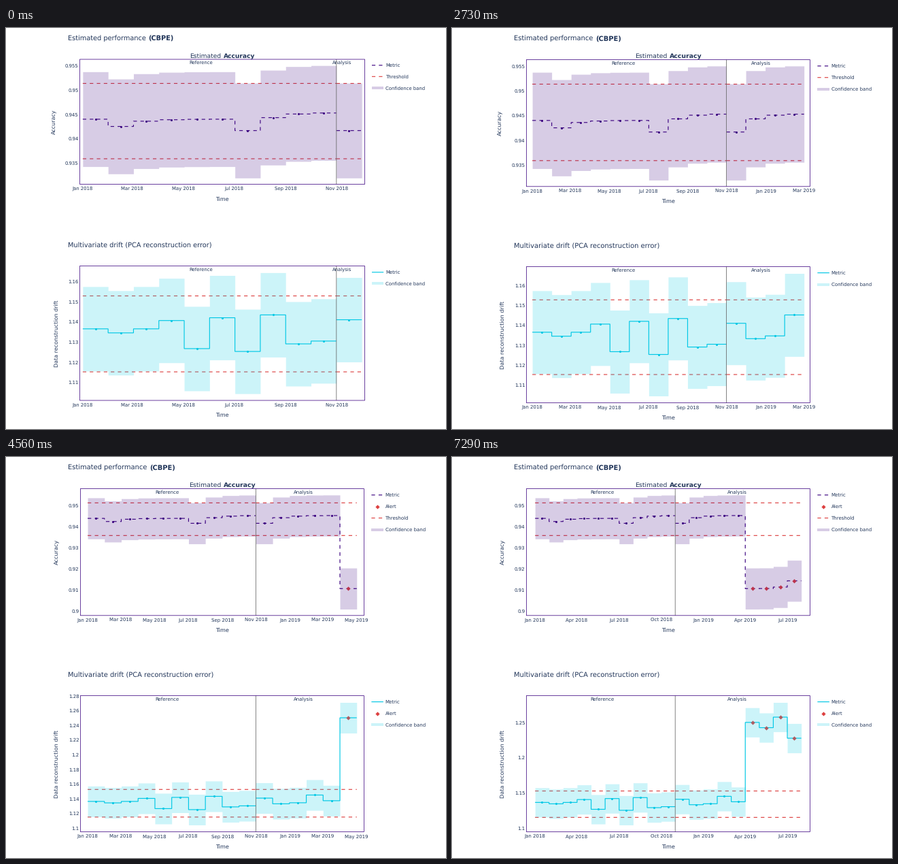
Write a matplotlib script that moves like this. It is 647 by 589 pixels and loops after 8.19 s.

```python
import math

import matplotlib.pyplot as plt
import numpy as np
from matplotlib.animation import FuncAnimation

W, H, DPI = 647, 589, 64
PX = 72 / DPI
STEP_MS, LOOP_MS = 30, 8190

INK, PURPLE, CYAN, RED = "#22365a", "#3b0280", "#00c8e5", "#dd4040"

plt.rcParams.update({
    "font.family": "DejaVu Sans",
    "text.hinting": "none",
    "lines.scale_dashes": False,
})

FIRST_DAY = np.datetime64("2018-01-01")
CHUNK_DAYS = 30.32
FIRST_COUNT, LAST_COUNT = 11, 19
N_REF = 10
FIRST_ALERT = 15


def accuracy(i):
    """Dips that recover towards a level, then a lasting drop."""
    if i >= FIRST_ALERT:
        return .9107 + .0037 * ((i - FIRST_ALERT) / 3) ** 4
    dip = max(d for d in (-4, 1, 6, 10) if d <= i)
    level, depth = (.9454, .0037) if i >= 6 else (.94405, .0015)
    return level - depth * .28 ** (i - dip)


def drift(i):
    """A calm start, a growing zigzag, a rising 3-chunk wave, then a jump."""
    if i >= FIRST_ALERT:
        return 1.248 + .0025 * (-2) ** (i - FIRST_ALERT)
    if i < 3:
        return 1.1356 + .001 * (-1) ** i
    if i < 8:
        return 1.1341 - (.0045 + .0007 * i) * (-1) ** i
    return 1.121 + .0014 * i + .0061 * math.cos(math.tau * (i - 1) / 3)


class Layout:
    """Scale and positions of one stage arrangement."""

    def __init__(self, scale, left, right, boxes, titles, legends, legend_x):
        self.scale = scale
        self.left, self.right = left, right
        self.boxes, self.titles = boxes, titles
        self.legends, self.legend_x = legends, legend_x


NARROW = Layout(.573, 108.5, 527.5, [(46, 229.5), (349.5, 547)],
                (14.4, 318.2), (54.7, 358.7), 538)
WIDE = Layout(.583, 109.4, 526.4, [(46.5, 232.8), (350.5, 550.5)],
              (14.8, 318.8), (55.8, 359.6), 537.4)


def label(ax, x, y, text, size, ha="center", weight="normal"):
    """Place text with its capitals centred on y."""
    return ax.text(x, y + .365 * size, text, fontsize=size * PX, color=INK,
                   ha=ha, va="baseline", weight=weight)


def heading(ax, x, y, plain, bold, size, centred=False):
    """A plain word followed by a bold one."""
    first = label(ax, x, y, plain, size, "left")
    second = label(ax, x, y, bold, size, "left", "bold")
    shift = first.get_window_extent().width + .34 * size
    if centred:
        x -= (shift + second.get_window_extent().width) / 2
    first.set_x(x)
    second.set_x(x + shift)


def stroke(ax, x, y, color, width, dash=0, z=2):
    style = (0, (dash * PX, dash * PX)) if dash else "-"
    ax.plot(x, y, color=color, lw=width * PX, ls=style, zorder=z,
            dash_capstyle="butt", solid_capstyle="butt",
            solid_joinstyle="miter", snap=False)


def dots(ax, x, y, marker, size, color, z):
    ax.plot(x, y, marker, ms=size * PX, color=color, mew=0, zorder=z)


def stairs(edges, values):
    return np.repeat(edges, 2)[1:-1], np.repeat(values, 2)


def draw_legend(ax, lay, top, color, dash, rows):
    x, k = lay.legend_x, lay.scale
    xs = [x, x + 30 * k]
    for i, name in enumerate(rows):
        y = top + i * 29 * k
        if name == "Metric":
            stroke(ax, xs, [y, y], color, 2 * k, dash)
        elif name == "Threshold":
            stroke(ax, xs, [y, y], RED, 2 * k, 9 * k)
        elif name == "Alert":
            dots(ax, [x + 15 * k], [y], "D", 4.4, RED, 2)
        else:
            ax.fill_between(xs, y - 2, y + 2, color=color, alpha=.2, lw=0)
        label(ax, x + 20.1, y, name, 12 * k, "left")


def draw_plot(ax, lay, box, n, metric, half, limits, color, dash, step,
              tick_months, y_title, y_title_x):
    k = lay.scale
    top, bottom = box
    values = np.array([metric(i) for i in range(n)])

    span = n * CHUNK_DAYS
    gap = .0627 * (span - 277)
    day = (lay.right - lay.left) / (span + 2 * gap)
    low, high = values.min() - half, values.max() + half
    pad = (high - low) / 18
    low, high = low - pad, high + pad

    def px(days):
        return lay.left + (days + gap) * day

    def chunk_x(i):
        return px(np.asarray(i) * CHUNK_DAYS)

    def py(v):
        return top + (high - np.asarray(v)) / (high - low) * (bottom - top)

    # Reference and analysis are separate strokes, so dashes restart.
    for a, b in ((0, N_REF), (N_REF, n)):
        edges = chunk_x(np.arange(a, b + 1))
        x, v = stairs(edges, values[a:b])
        stroke(ax, x, py(v), color, 2 * k, dash, 2)
        for limit in limits:
            stroke(ax, edges[[0, -1]], py([limit, limit]), RED, 2 * k,
                   9 * k, 3)

    middles = chunk_x(np.arange(n) + .5)
    dots(ax, middles, py(values), "o", 3.1, color, 2.5)
    dots(ax, middles[FIRST_ALERT:], py(values[FIRST_ALERT:]), "D", 4.4,
         RED, 4)

    x, v = stairs(chunk_x(np.arange(n + 1)), values)
    ax.fill_between(x, py(v - half), py(v + half), color=color, alpha=.2,
                    lw=0, zorder=5, snap=False)

    split = chunk_x(N_REF)
    stroke(ax, [split, split], [top, bottom], "#666666", .8, z=6)
    ax.add_patch(plt.Rectangle((lay.left, top), lay.right - lay.left,
                               bottom - top, fill=False, ec=PURPLE,
                               lw=.75 * PX, zorder=7, snap=False))

    small = 12 * k
    label(ax, chunk_x((N_REF - 1) / 2) + 5.8, top + 4.4, "Reference", small)
    label(ax, chunk_x((N_REF + n - 1) / 2) + 8.3, top + 4.4, "Analysis",
          small)

    for m in range(0, LAST_COUNT, tick_months):
        month = np.datetime64("2018-01") + m
        days = (month.astype("datetime64[D]") - FIRST_DAY).astype(int)
        if days <= span + gap:
            label(ax, px(days), bottom + 6, month.item().strftime("%b %Y"),
                  small)
    for i in range(math.ceil(low / step), math.floor(high / step) + 1):
        label(ax, lay.left - 1.8, py(i * step), f"{round(i * step, 4):g}",
              small, "right")

    label(ax, (lay.left + lay.right) / 2, bottom + 21.4, "Time", 14 * k)
    ax.text(y_title_x, (top + bottom) / 2, y_title, fontsize=14 * k * PX,
            color=INK, rotation=90, ha="center", va="center")


def build_stage(fig, n):
    ax = fig.add_axes([0, 0, 1, 1])
    ax.set_xlim(0, W)
    ax.set_ylim(H, 0)
    ax.set_autoscale_on(False)
    ax.axis("off")

    lay = NARROW if n == FIRST_COUNT else WIDE
    k = lay.scale
    alert = n > FIRST_ALERT
    months = 3 if n == LAST_COUNT else 2
    drift_step = .01 if not alert else .02 if n < 18 else .05

    heading(ax, 91.2, lay.titles[0], "Estimated performance", "(CBPE)",
            17 * k)
    label(ax, 91.2, lay.titles[1],
          "Multivariate drift (PCA reconstruction error)", 17 * k, "left")
    heading(ax, 318.3, 40.3, "Estimated", "Accuracy", 16 * k, centred=True)

    draw_plot(ax, lay, lay.boxes[0], n, accuracy, .00976, (.9514, .9359),
              PURPLE, 9 * k, .01 if alert else .005, months,
              "Accuracy", 75 if alert else 70.8)
    draw_plot(ax, lay, lay.boxes[1], n, drift, .0209, (1.1529, 1.1153),
              CYAN, 0, drift_step, months, "Data reconstruction drift", 75)

    extra = ["Alert"] if alert else []
    draw_legend(ax, lay, lay.legends[0], PURPLE, 9 * k,
                ["Metric", *extra, "Threshold", "Confidence band"])
    draw_legend(ax, lay, lay.legends[1], CYAN, 0,
                ["Metric", *extra, "Confidence band"])
    return ax


def start_ms(stage):
    """Stages last 30 steps; every fourth one lasts a step longer."""
    return STEP_MS * (30 * stage + stage // 4 + 1) if stage else 0


fig = plt.figure(figsize=(W / DPI, H / DPI), dpi=DPI, facecolor="white")
stages = [build_stage(fig, n) for n in range(FIRST_COUNT, LAST_COUNT + 1)]
starts = [start_ms(s) for s in range(len(stages))]


def show(i):
    current = sum(start <= i * STEP_MS for start in starts) - 1
    for j, ax in enumerate(stages):
        ax.set_visible(j == current)
    return stages


anim = FuncAnimation(fig, show, frames=LOOP_MS // STEP_MS, interval=STEP_MS,
                     init_func=lambda: show(0), repeat=True, repeat_delay=0,
                     blit=False)
plt.show()
```
